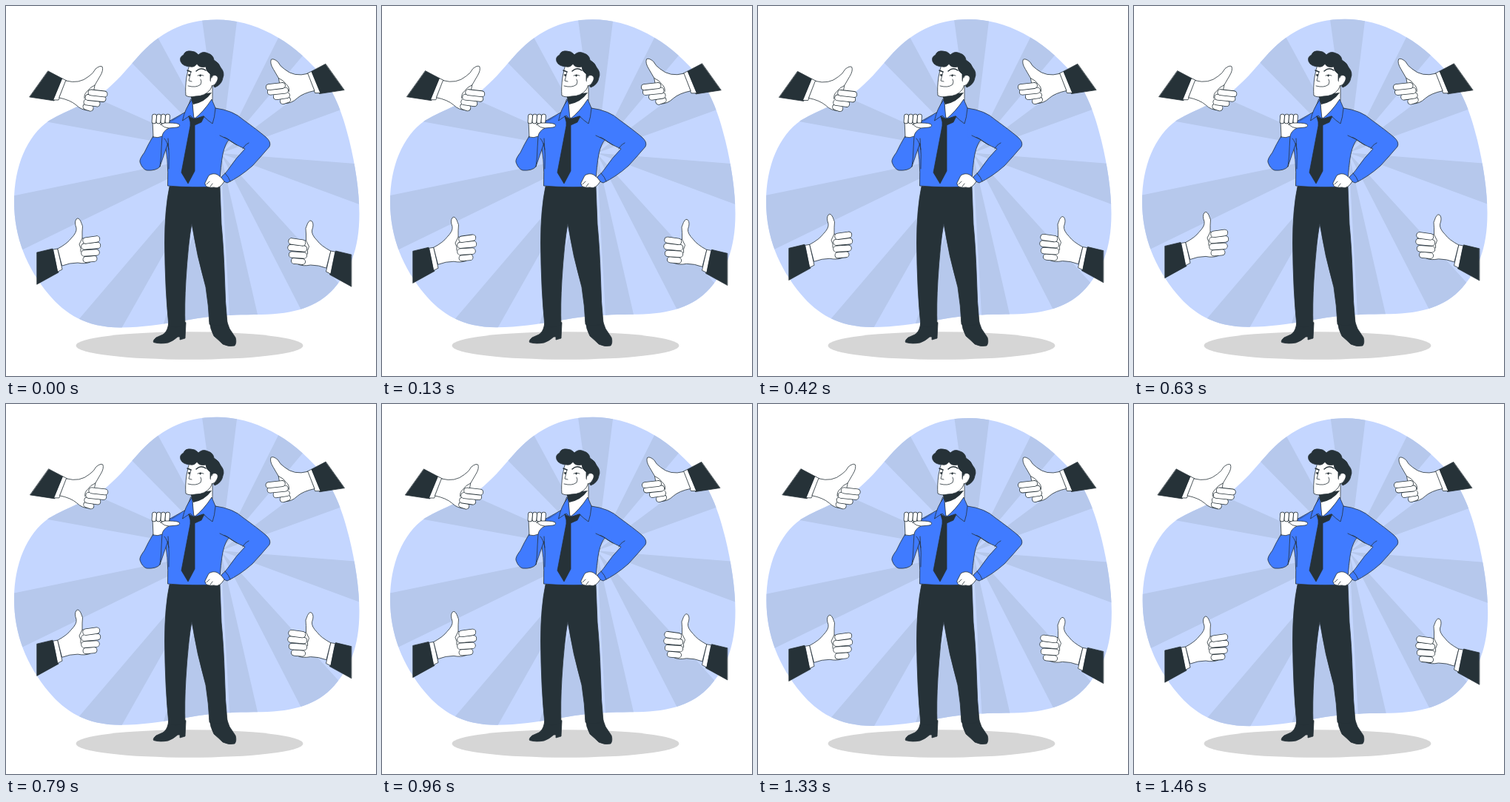
These frames come from a looping animation (500 px wide and 500 px high, 1.5 s). An HTML page with a canvas:

```html
<!DOCTYPE html>
<html lang="en">
<head>
<meta charset="utf-8">
<title>Thumbs up</title>
<style>
html, body { margin: 0; width: 100%; height: 100%; overflow: hidden; background: #fff; }
canvas { display: block; width: 100vmin; height: 100vmin; }
</style>
</head>
<body>
<canvas id="stage"></canvas>
<script>
const canvas = document.getElementById('stage');
const ctx = canvas.getContext('2d');
const LOOP = 1500;
const INK = '#263238', BLUE = '#407bff', PALE = '#c4d6ff', RAY = '#b6c8ec';

const ratio = Math.max(1, window.devicePixelRatio || 1);
canvas.width = canvas.height = 500 * ratio;

function shape(d, fill, stroke = INK, width = 0.8) {
  const path = new Path2D(d);
  if (fill) { ctx.fillStyle = fill; ctx.fill(path); }
  if (stroke) { ctx.strokeStyle = stroke; ctx.lineWidth = width; ctx.stroke(path); }
}
const line = (d, width = 0.8) => shape(d, null, INK, width);

// Rounded white finger with a thin outline
function finger(d, width) {
  shape(d, null, INK, width + 0.8);
  shape(d, null, '#fff', width - 0.8);
}

// Linear interpolation through [time, value] pairs
function track(keys, t) {
  const i = keys.findIndex(k => k[0] > t);
  if (i < 0) return keys[keys.length - 1][1];
  const [t0, v0] = keys[i - 1], [t1, v1] = keys[i];
  return v0 + (v1 - v0) * (t - t0) / (t1 - t0);
}

const slideKeys = [[0, 0], [170, 2.3], [250, 1.9], [420, -3.3], [630, 1.9], [960, -0.3], [1170, 2.3], [1460, 0.3], [1500, 0]];
const pulseKeys = [[0, 0.1], [250, 1], [420, 0.1], [630, 0.5], [960, 0], [1500, 0]];
const liftKeys = [[0, 0], [720, -9.8], [1460, 0], [1500, 0]];
const settleKeys = [[0, 0], [630, -0.7], [960, -0.7], [1170, 0], [1460, 0.7], [1500, 0]];

const blob = new Path2D('M177 70C207 36 240 18.5 285 18.5C335 18.5 385 45 424 91C442 113 454 141 464 182' +
  'C472 215 477.5 250 477.5 281C477.5 330 464 358 443 382C420 407 390 416 345 417' +
  'C290 417 270 420 235 426C210 430 185 434.5 155 434.5C108 434.5 80 416 58 390C28 354 11 312 11 265' +
  'C11 217 28 176 58 155C86 139 112 131 131 117C150 102 161 88 177 70Z');

// Each pair marks the two outer corners of a darker ray
const rays = [
  [[265, 19], [312, 21]], [[368, 43], [401, 67]], [[428, 96], [456, 139]],
  [[470, 213], [477, 268]], [[448, 373], [399, 411]], [[340, 417], [302, 418]],
  [[275, 420], [213, 429]], [[157, 434], [97, 425]],
  [[25, 328], [12, 256]], [[58, 157], [117, 122]], [[173, 80], [207, 46]]
];

function background(shift) {
  const cx = 290, cy = 199, reach = 1.3;
  ctx.save();
  ctx.translate(Math.max(0, shift), shift);
  ctx.fillStyle = PALE;
  ctx.fill(blob);
  ctx.clip(blob);
  ctx.fillStyle = RAY;
  for (const pair of rays) {
    ctx.beginPath();
    ctx.moveTo(cx, cy);
    for (const [x, y] of pair) ctx.lineTo(cx + (x - cx) * reach, cy + (y - cy) * reach);
    ctx.fill();
  }
  ctx.restore();
  ctx.fillStyle = '#d6d6d6';
  ctx.beginPath();
  ctx.ellipse(248, 459, 153.5, 18.8, 0, 0, 2 * Math.PI);
  ctx.fill();
}

function legs() {
  shape('M220 428L219 433Q217 441 212 444L203 448Q198 452 199.500 454.500Q208 457 219 455Q227 452 232 447L235 447L235 451L242 449L243 428Z', INK);
  shape('M275 425Q276 437 281 446Q288 452 293 457Q301 461 309 459Q312 455 310 448L302 436L298 425Z', INK);
  shape('M221 244Q214.500 275 214.500 320Q215 385 220 432Q231 436 242 431Q241 405 243 371Q246 322 251 294' +
    'Q258 338 270 380Q274 405 275 430Q287 434 299 429Q296 400 295.500 370Q294 325 291 295L289 244Z', INK);
}

function torso() {
  shape('M243 143Q229 151 218 157L213 177Q220 205 218.500 243Q250 246 288.500 244Q290 215 293 200Q296 186 302 180L300 148L283 138L250 126Z', BLUE);
  // Arm on the hip
  shape('M283 138Q307 141 321 154Q339 167 351 177Q359 184 356 190Q345 203 333 216Q316 231 299 239Q292 237 291 231' +
    'Q298 225 301 220Q311 205 323 193Q307 186 300 180Q292 175 288 176', BLUE);
  shape('M281 140L298 148L298 177L284 178Z', BLUE, null);
  line('M328 185Q322 188 320 193M289 175Q300 179 312 188');
  line('M296 226Q301 231 303 237');
  // Raised arm
  shape('M236 149Q225 154 218 160Q211 172 200 174Q192 187 187 198Q180 207 181 211Q184 220 190 222Q203 223 208 217' +
    'Q213 202 219 185L233 168Z', BLUE);
  shape('M220 158L242 145L240 190L220 190L216 175Z', BLUE, null);
  line('M211 176Q210 190 209.500 204L208 217M214 179Q218 183 220 194M219 179Q221 201 220 220');
  shape('M269 239L274 229Q280 225 286 228Q292 232 295 237Q292 242 289 244Q285 247 281 245Q273 246 270 243Z', '#fff');
  line('M271 241L275 237M276 244L279 240');
}

function raisedHand() {
  shape('M199 177L198 155L221 154L220 165Q212 169 211 176Q205 179 199 177Z', '#fff');
  for (const x of [200.5, 206.5, 212.5, 218.5]) finger(`M${x} 149L${x - 0.5} 156`, 5.8);
  shape('M209 160Q214 157 221 158Q231 158 234 160Q236 163 231 164L220 165Q214 165 209 160Z', '#fff');
}

function head() {
  shape('M252 116L252 150L257 152L279 128L279 103Z', '#fff');
  shape('M249 121L278 117Q269 130 253 133Z', INK, null);
  shape('M249 76Q246 85 244 96Q242 111 243 121Q248 124 256 122Q269 122 276 113L282 101L283 80L268 72Z', '#fff');
  shape('M250 82Q239 82 236 75Q234 69 240 66Q242 60 250 61Q256 61 260 66Q266 60 273 64Q280 66 281 73Q288 77 290 83' +
    'Q296 90 293 97Q292 104 286 108L282 110L276 101L276 92Q270 88 270 82Q261 84 258 78Q255 83 250 82Z', INK);
  shape('M277 98Q279 92 284 94Q288 96 285 102Q281 110 276 107Z', '#fff', null);
  line('M278 97Q280 92 284 94Q288 96 285 102Q282 108 278 108');
  line('M245 87L250 89M257 88Q263 82 270 87', 1.5);
  line('M246 93L249 93M259 94Q263 92 267 94M250 89L247 101L251 102');
  line('M246 108Q257 111 263 106Q265 102 263 99');
  shape('M247.500 92a1.200 1.500 0 1 0 .1 0M262.500 92.500a1.200 1.500 0 1 0 .1 0', INK, null);
}

function collar() {
  shape('M251 127Q242 138 238.500 155Q244 151 249 148L254 153L252 132Z', BLUE);
  shape('M254 153Q267 143 278 126L283 138Q282 151 279 159Q273 155 267 149Z', BLUE);
  shape('M247 149L254 153L268 149L264 157L255 161L255 223L246 240L237 225L249 162L249 157Z', INK);
}

function upperThumb() {
  shape('M57 88L76 98L65 128L32 123Z', INK);
  shape('M76 98L82 101L71 127L64 127Z', '#fff');
  shape('M81 101Q99 106 112 95Q118 91 121 85Q127 80 130 82Q132 87 127 95L120 107L118 118L112 141' +
    'Q102 141 95 134Q87 127 72 124Z', '#fff');
  finger('M108 136L114 138', 8);
  finger('M109 130L123 132', 8);
  finger('M111 123.500L131 125.500', 8);
  finger('M115 117L133 119', 8);
  line('M120 107Q113 110 110 115Q105 119 106 125');
}

function lowerThumb() {
  shape('M42 333L63 328L71 360L42 376Z', INK);
  shape('M64 329L70 328L76 356L70 359Z', '#fff');
  shape('M70 328Q83 321 88 314Q96 306 95 300Q92 292 95 288Q98 285 101 291Q105 297 103 305L103 314L113 315' +
    'L114 346Q107 349 97 347Q86 347 76 351Z', '#fff');
  finger('M108 342.500L119 341.500', 8);
  finger('M106 334L122 333', 8.5);
  finger('M106 325L123.500 323.500', 8.5);
  finger('M108 317L122.500 315', 8.5);
  line('M103 314L99 322Q102 328 101 332');
}

function place(draw, x, y, mirror = false) {
  ctx.save();
  ctx.translate(x, y);
  if (mirror) ctx.scale(-1, 1);
  draw();
  ctx.restore();
}

function frame(now) {
  const t = now % LOOP;
  const slide = track(slideKeys, t);
  const lift = track(liftKeys, t);
  const pulse = 1 + 0.042 * track(pulseKeys, t);

  ctx.setTransform(ratio, 0, 0, ratio, 0, 0);
  ctx.fillStyle = '#fff';
  ctx.fillRect(0, 0, 500, 500);
  ctx.lineJoin = ctx.lineCap = 'round';

  background(track(settleKeys, t));
  legs();
  torso();
  head();
  collar();
  raisedHand();

  place(upperThumb, slide, -slide * 0.15);
  ctx.save();
  ctx.translate(400, 102);
  ctx.scale(pulse, pulse);
  place(upperThumb, 88.5, -111.5, true);
  ctx.restore();
  place(lowerThumb, 0, lift);
  place(lowerThumb, 508.5, lift * 0.95 + 3, true);

  requestAnimationFrame(frame);
}
requestAnimationFrame(frame);
</script>
</body>
</html>
```
